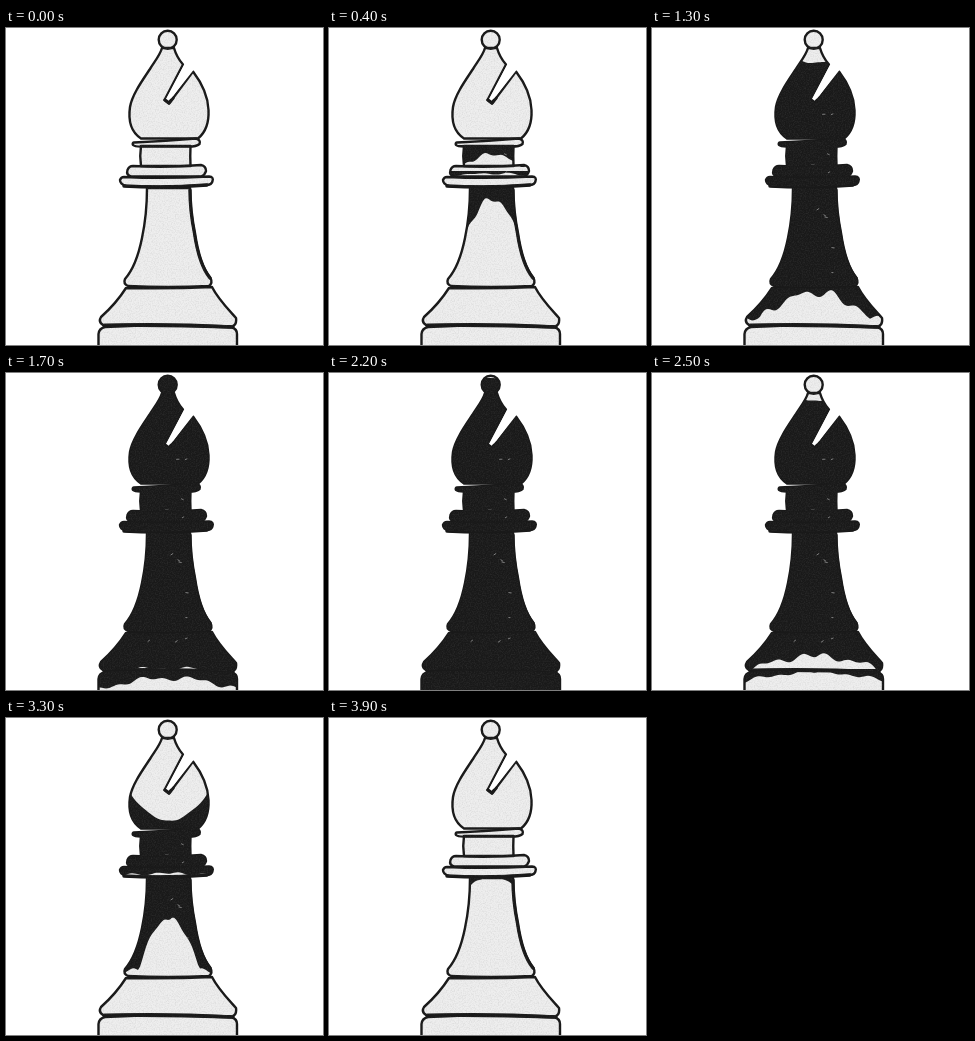
Animation of 317x317 px, one loop 4 s. Source, as an HTML page:

```html
<!DOCTYPE html>
<html lang="en">
<head>
<meta charset="utf-8">
<title>Bishop</title>
<style>
  html, body { margin: 0; width: 100%; height: 100%; overflow: hidden; background: #fff; }
  svg { display: block; width: 100%; height: 100%; }
  .paper { fill: #eee; }
  .ink { fill: #191919; }
  .line { fill: none; stroke: #191919; stroke-width: 2.4; stroke-linejoin: round; stroke-linecap: round; }
  .bold { stroke-width: 3.4; }
  .fleck { fill: none; stroke: #999; stroke-width: .8; stroke-linecap: round; }
</style>
</head>
<body>
<svg viewBox="0 0 317 317">
  <defs>
    <circle id="ball" cx="161.700" cy="11.800" r="9"/>
    <path id="head" d="M156 20C154 27 149 33 144 41C136 53 126 67 124 79C122 93 125 104 135 110.500H192C200 104 203 93 202.500 82C202 67 195 54 187 43.500L163 75.500L158.500 72L177 36.500C173 32 170 27 168 20Z"/>
    <path id="ring" d="M128 114.500Q160 113 190 110.500Q195 112 193.500 116Q190 119 180 118.500H138Q129 119 127 117Q126 115 128 114.500Z"/>
    <path id="neck" d="M135 118Q133.500 128 135 138H184.500Q184 128 184.500 118Z"/>
    <path id="lip" d="M127 138Q161 140 195 137Q200 138 200 143Q199 147 195 148.500H125Q120 147 121.500 142Q123 138 127 138Z"/>
    <path id="collar" d="M118 149Q160 151 203 148.500Q208 149 206.500 153Q206 157 200 157Q160 160 120 158Q114 156 114 152Q115 149 118 149Z"/>
    <path id="stem" d="M141 160C141 176 140 191 136 210C132 230 126 243 119 251Q117 256 122 258Q162 260 203 258Q207 255 204.500 250C195 239 191 222 188.500 205C185.500 190 184 173 184 160Z"/>
    <path id="base" d="M120 260C113 271 104 281 95 289Q92 294 97 297Q160 295 226 298.500Q231 297 230 290C222 281 212 271 206 259Q164 261 120 260Z"/>
    <path id="foot" d="M92.500 322V306Q93 300.500 99 299Q161 296 226 299.500Q231 301 231 306V322Z"/>

    <clipPath id="body"></clipPath>
    <clipPath id="wet"><path id="wetPath"/></clipPath>

    <filter id="rough" filterUnits="userSpaceOnUse" x="0" y="0" width="317" height="325" color-interpolation-filters="sRGB">
      <feTurbulence type="fractalNoise" baseFrequency=".06" numOctaves="2" seed="4"/>
      <feDisplacementMap in="SourceGraphic" scale="1.4" xChannelSelector="R" yChannelSelector="G"/>
    </filter>
    <filter id="grain" filterUnits="userSpaceOnUse" x="0" y="0" width="317" height="317" color-interpolation-filters="sRGB">
      <feTurbulence type="fractalNoise" baseFrequency=".75" numOctaves="2" seed="9"/>
      <feColorMatrix values="0 0 0 0 .5  0 0 0 0 .5  0 0 0 0 .5  .35 0 0 0 -.14"/>
    </filter>
  </defs>

  <g filter="url(#rough)">
    <g class="paper" id="paper"></g>
    <g clip-path="url(#wet)">
      <g class="ink" id="ink"></g>
      <path class="fleck" id="flecks"/>
    </g>
    <g class="line" id="lines"></g>
    <path class="line bold" d="M159 72L163 75L167 70M118 158Q160 160.500 201 157M98 297.500Q160 296.500 227 299M184 162C184 173 185.500 190 188.500 205C191 222 195 239 204 250"/>
    <path fill="#fff" d="M178.500 36L187.500 42L165 70.500L160 71Z"/>
  </g>
  <g clip-path="url(#body)"><rect width="317" height="317" filter="url(#grain)"/></g>
</svg>

<script>
const LOOP = 4000, STEP = 100, MID = 163;
const $ = id => document.getElementById(id);

const parts = ["ball", "head", "ring", "neck", "lip", "collar", "stem", "base", "foot"];
const uses = parts.map(p => `<use href="#${p}"/>`).join("");
for (const id of ["paper", "ink", "lines", "body"]) $(id).innerHTML = uses;

// Ink runs through each zone from one height to another, then back.
// narrow/wide: half widths at either end; droop: how far the sides lead.
const zones = [
  { from: 118, to: -4, rim: 112, fill: [480, 1800], drain: [1900, 3700], narrow: 40, wide: 40, droop: 95, ripple: 2 },
  { from: 110, to: 120, fill: [400, 700], drain: [3300, 3600], narrow: 36, wide: 36, droop: 5, ripple: 2 },
  { from: 117, to: 139, fill: [200, 650], drain: [3300, 3800], narrow: 25, wide: 25, droop: 26, ripple: 4 },
  { from: 136, to: 143, fill: [400, 700], drain: [3300, 3700], narrow: 42, wide: 42, droop: 5, ripple: 2 },
  { from: 143, to: 160, fill: [300, 700], drain: [3100, 3700], narrow: 48, wide: 48, droop: 8, ripple: 3 },
  { from: 158, to: 300, fill: [50, 1900], drain: [2100, 4000], narrow: 22, wide: 68, droop: 95, ripple: 11 },
  { from: 296, to: 322, fill: [1500, 2000], drain: [2150, 2600], narrow: 70, wide: 70, droop: 30, ripple: 6 }
];

const mix = (a, b, k) => a + (b - a) * k;
const clamp = (v, a, b) => Math.min(Math.max(v, Math.min(a, b)), Math.max(a, b));

function ease(t, [start, end]) {
  const k = clamp((t - start) / (end - start), 0, 1);
  return k * k * (3 - 2 * k);
}

function pool(z, t) {
  const draining = t >= z.drain[0];
  const p = draining ? 1 - ease(t, z.drain) : ease(t, z.fill);
  if (p === 0) return "";
  const rim = z.rim ?? z.from, dir = Math.sign(z.to - z.from);
  const level = mix(z.from, z.to, p), width = mix(z.narrow, z.wide, p * p);
  const droop = z.droop * Math.sqrt(p) * (1 - p);
  const ripple = z.ripple * Math.sqrt(p * (1 - p));
  const phase = draining ? 2 : 0;
  let d = `M80 ${rim}`;
  for (let x = 80; x <= 246; x += 2) {
    const u = Math.min(Math.abs(x - MID) / width, 1.15);
    const wave = Math.cos(u * 9 + phase) * .6 + Math.sin((x - MID) / 3.6 + phase) * .5;
    const y = clamp(level + dir * (droop * u * u + ripple * wave), rim, z.to);
    d += `L${x} ${y.toFixed(2)}`;
  }
  return d + `L246 ${rim}Z`;
}

let seed = 7;
const random = () => (seed = seed * 16807 % 2147483647) / 2147483647;

function scratches(count) {
  let d = "";
  for (let i = 0; i < count; i++) {
    const x = mix(142, 183, random()), y = mix(75, 285, random());
    d += `M${x} ${y}l${mix(1, 3, random())} ${mix(-2, 2, random())}`;
  }
  return d;
}
$("flecks").setAttribute("d", scratches(14));

let last = -1;
function draw(now) {
  const t = Math.floor(now % LOOP / STEP) * STEP;
  if (t !== last) {
    last = t;
    $("wetPath").setAttribute("d", zones.map(z => pool(z, t)).join("") || "M0 0");
  }
  requestAnimationFrame(draw);
}
draw(0);
</script>
</body>
</html>
```
